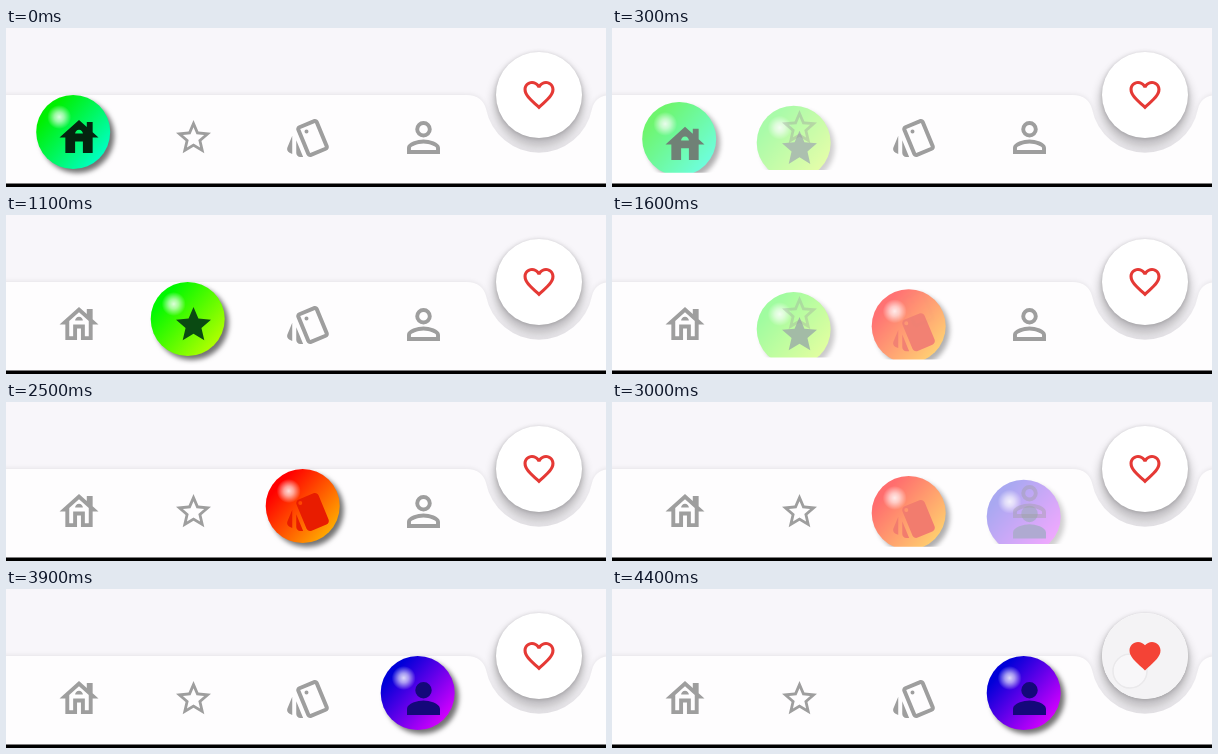
These frames come from a looping animation (600 by 159 pixels, 4.5 s). An HTML page:

```html
<!DOCTYPE html>
<html lang="en">
<head>
<meta charset="utf-8">
<title>Navigation bar</title>
<style>
html, body { margin: 0; width: 100%; height: 100%; overflow: hidden; background: #f8f6fa; }
svg { display: block; width: 600px; height: 159px; }
.outline { fill: #9e9e9e; }
.shade { filter: drop-shadow(4px 4px 2.5px rgba(0, 0, 0, .55)); }
.bar { fill: #fefdfe; filter: drop-shadow(0 -1px 2px rgba(0, 0, 0, .07)); }
.button { fill: #fff; filter: drop-shadow(0 1px 2px rgba(0, 0, 0, .2)); }
</style>
</head>
<body>
<svg id="stage" viewBox="0 0 600 159">
  <defs id="defs">
    <radialGradient id="shine">
      <stop offset="0" stop-color="#fff" stop-opacity=".85"/>
      <stop offset=".4" stop-color="#fff" stop-opacity=".6"/>
      <stop offset="1" stop-color="#fff" stop-opacity="0"/>
    </radialGradient>
    <filter id="soft" x="-30%" y="-30%" width="160%" height="160%"><feGaussianBlur stdDeviation="5"/></filter>
    <clipPath id="disc"><circle cx="533" cy="67" r="43"/></clipPath>
  </defs>
  <rect width="600" height="159" fill="#f8f6fa"/>
  <circle cx="533" cy="75" r="46" fill="#000" opacity=".2" filter="url(#soft)"/>
  <path class="bar" d="M-9 67H460C472 67 478 73 480 81A54 54 0 0 0 586 81C588 73 593 67 606 67V170H-9Z"/>
  <rect y="155.5" width="600" height="4" fill="#000"/>
  <g id="items"></g>
  <circle class="button" cx="533" cy="67" r="43"/>
  <g id="press" clip-path="url(#disc)">
    <circle cx="533" cy="67" r="43" fill="#f4f3f5"/>
    <circle id="ripple" cx="518" cy="82" fill="#f8f7f9" stroke="#eae9eb" stroke-width="1.5"/>
  </g>
  <path id="heart" transform="translate(514.4 48.3) scale(1.55)"/>
</svg>
<script>
const LOOP = 4500, FADE = 350, PRESS = 4250;
const starts = [150, 1380, 2850];

const heartFull = 'M12 21.35l-1.45-1.32C5.4 15.36 2 12.28 2 8.5 2 5.42 4.42 3 7.5 3c1.74 0 3.41.81 4.5 2.09C13.09 3.81 14.76 3 16.5 3 19.58 3 22 5.42 22 8.5c0 3.78-3.4 6.86-8.55 11.54z';
const heartLine = heartFull + 'M12.1 18.55l-.1.1-.1-.1C7.14 14.24 4 11.39 4 8.5 4 6.5 5.5 5 7.5 5c1.54 0 3.04.99 3.57 2.36h1.87C13.46 5.99 14.96 5 16.5 5c2 0 3.5 1.5 3.5 3.5 0 2.89-3.14 5.74-7.9 10.05z';
const starFull = 'M12 17.27L18.18 21l-1.64-7.03L22 9.24l-7.19-.61L12 2 9.19 8.63 2 9.24l5.46 4.73L5.82 21z';
const cards = 'M2.53 19.65l1.34.56v-9.03l-2.43 5.86c-.41 1.02.08 2.19 1.09 2.61zm19.5-3.7L17.07 3.98c-.31-.75-1.04-1.21-1.81-1.23-.26 0-.53.04-.79.15L7.1 5.95c-.75.31-1.21 1.03-1.23 1.8-.01.27.04.54.15.8l4.96 11.97c.31.76 1.05 1.22 1.83 1.23.26 0 .52-.05.77-.15l7.36-3.05c1.02-.42 1.51-1.59 1.09-2.6zM5.88 19.75c0 1.1.9 2 2 2h1.45l-3.45-8.34z';
const person = 'M12 4a4 4 0 1 0 0 8a4 4 0 1 0 0-8zm0 9c-2.67 0-8 1.34-8 4v3h16v-3c0-2.66-5.33-4-8-4z';

const tabs = [
  { x: 73, y: 109.5, scale: 1.95, from: '#00f000', to: '#00ffc8', ink: '#04240f',
    line: 'M19 9.3V4h-3v2.6L12 3 2 12h3v8h6v-6h2v6h6v-8h3zM17 18h-2v-6H9v6H7v-7.81l5-4.5 5 4.5zM10 10h4c0-1.1-.9-2-2-2s-2 .9-2 2z',
    full: 'M19 9.3V4h-3v2.6L12 3 2 12h3v8h5v-6h4v6h5v-8h3zM10 10c0-1.1.9-2 2-2s2 .9 2 2z' },
  { x: 187.5, y: 109.5, scale: 1.75, from: '#00f800', to: '#b4ff00', ink: '#0a4a12',
    line: starFull + 'M12 15.4l-3.76 2.27 1-4.28-3.32-2.88 4.38-.38L12 6.1l1.71 4.04 4.38.38-3.32 2.88 1 4.28z',
    full: starFull },
  { x: 302.5, y: 109.5, scale: 2, from: '#ff0000', to: '#ffae00', ink: '#e81c00',
    line: cards + 'M12.83 19.75L7.87 7.79l7.35-3.04 4.96 11.95zM10 9a1 1 0 1 0 2 0a1 1 0 1 0-2 0z',
    full: cards + 'M6.88 7.75a1 1 0 1 0 2 0a1 1 0 1 0-2 0z' },
  { x: 417.5, y: 109.5, scale: 2.06, from: '#0000d8', to: '#d800ff', ink: '#14087a',
    line: person + 'M12 5.9a2.1 2.1 0 1 0 0 4.2a2.1 2.1 0 1 0 0-4.2zM12 14.9c2.97 0 6.1 1.46 6.1 2.1v1.1H5.9V17c0-.64 3.13-2.1 6.1-2.1z',
    full: person }
];

const $ = id => document.getElementById(id);

function add(parent, tag, attrs) {
  const el = document.createElementNS('http://www.w3.org/2000/svg', tag);
  for (const key in attrs) el.setAttribute(key, attrs[key]);
  return parent.appendChild(el);
}

function icon(parent, tab, d, attrs) {
  const place = `translate(${tab.x} ${tab.y}) scale(${tab.scale}) translate(-12 -12)`;
  return add(parent, 'path', { d, transform: place, 'fill-rule': 'evenodd', ...attrs });
}

tabs.forEach((tab, i) => {
  const cx = tab.x - 5.8, cy = 104;
  const paint = add($('defs'), 'linearGradient', { id: 'paint' + i, x1: .1, y1: .15, x2: .9, y2: .85 });
  add(paint, 'stop', { offset: .1, 'stop-color': tab.from });
  add(paint, 'stop', { offset: 1, 'stop-color': tab.to });
  const clip = add($('defs'), 'clipPath', { id: 'clip' + i });
  tab.clip = add(clip, 'rect', { x: cx - 45, y: 55, width: 100, height: 95 });

  tab.ball = add($('items'), 'g', { 'clip-path': `url(#clip${i})` });
  tab.body = add(tab.ball, 'g', {});
  add(tab.body, 'circle', { cx, cy, r: 37, fill: `url(#paint${i})`, class: 'shade' });
  add(tab.body, 'circle', { cx: cx - 14, cy: cy - 15, r: 12, fill: 'url(#shine)' });
  icon(tab.body, tab, tab.full, { fill: tab.ink });
  tab.rest = add($('items'), 'g', { class: 'outline' });
  icon(tab.rest, tab, tab.line, {});
});

const clamp = v => Math.min(1, Math.max(0, v));

function drawTab(tab, level) {
  const drop = 16 * (1 - level);
  tab.ball.setAttribute('opacity', level);
  tab.body.setAttribute('transform', `translate(0 ${drop})`);
  tab.clip.setAttribute('height', 95 - .75 * drop);
  tab.rest.setAttribute('opacity', clamp(1 - 1.8 * level));
  tab.rest.setAttribute('transform', `translate(0 ${-30 * level})`);
}

function draw(t) {
  const steps = starts.map(s => clamp((t - s) / FADE));
  tabs.forEach((tab, i) => {
    const enter = i ? steps[i - 1] ** 1.3 : 1;
    const leave = i < 3 ? steps[i] : 0;
    drawTab(tab, enter * (1 - leave));
  });

  const press = clamp((t - PRESS) / 150);
  const liked = t >= PRESS + 100;
  $('press').setAttribute('opacity', press);
  $('ripple').setAttribute('r', 17 * press);
  $('heart').setAttribute('d', liked ? heartFull : heartLine);
  $('heart').setAttribute('fill', liked ? '#f44336' : '#e53935');
  $('heart').setAttribute('fill-rule', 'evenodd');
}

const begin = performance.now();
function tick() {
  draw((performance.now() - begin) % LOOP);
  requestAnimationFrame(tick);
}
draw(0);
requestAnimationFrame(tick);
</script>
</body>
</html>
```
